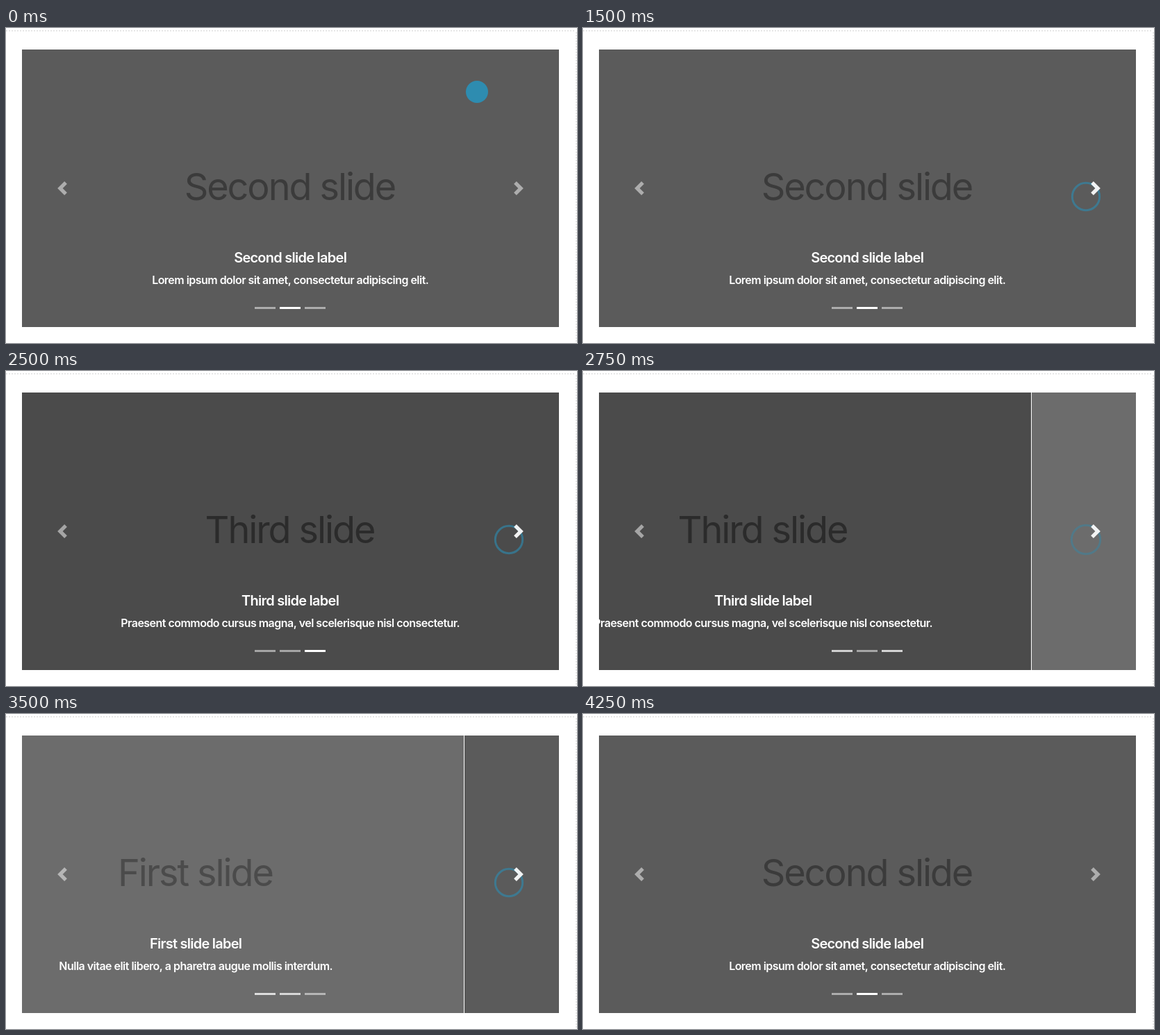
An HTML page with a canvas for the animation above (4.75 s loop, 822x454 px).

```html
<!DOCTYPE html>
<html lang="en">
<head>
<meta charset="utf-8">
<title>Carousel</title>
<style>
  html, body { margin: 0; width: 100%; height: 100%; overflow: hidden; background: #fff; }
  canvas { display: block; font-optical-sizing: none; }
</style>
</head>
<body>
<canvas id="stage" width="822" height="454"></canvas>
<script>
const ctx = document.getElementById('stage').getContext('2d');
const LOOP = 4750;
const STEP = 250; // the picture is sampled four times a second
const FRAME = { x: 23, y: 31, w: 773, h: 400 };
const SANS = 'Inter, "Liberation Sans", sans-serif';
const BLUE = '#2e8cb0';

const slides = [
  { title: 'First slide', bg: '#6c6c6c', ink: '#4b4b4b',
    text: 'Nulla vitae elit libero, a pharetra augue mollis interdum.' },
  { title: 'Second slide', bg: '#5b5b5b', ink: '#3b3b3b',
    text: 'Lorem ipsum dolor sit amet, consectetur adipiscing elit.' },
  { title: 'Third slide', bg: '#4b4b4b', ink: '#2b2b2b',
    text: 'Praesent commodo cursus magna, vel scelerisque nisl consectetur.' }
];

const turns = [
  { start: 1591, duration: 526 },
  { start: 2588.5, duration: 557 },
  { start: 3252, duration: 901 }
];

const presses = [700, 1480, 2480, 3480];
const RING_LIFE = 530;

const pointerPath = [
  { t: 250, x: 678, y: 92 },
  { t: 500, x: 606, y: 221 },
  { t: 750, x: 604, y: 241 },
  { t: 1250, x: 724, y: 243 },
  { t: 3500, x: 724, y: 243 },
  { t: 3750, x: 750, y: 154 }
];

const nextIcon = new Path2D('M2.75 0l-1.5 1.5 2.5 2.5-2.5 2.5 1.5 1.5 4-4-4-4z');
const prevIcon = new Path2D('M5.25 0l-4 4 4 4 1.5-1.5-2.5-2.5 2.5-2.5-1.5-1.5z');

const clamp = v => Math.min(1, Math.max(0, v));
const mix = (a, b, k) => a + (b - a) * k;
const easeInOut = k => (1 - Math.cos(Math.PI * clamp(k))) / 2;

function carouselAt(time) {
  const started = turns.filter(turn => turn.start <= time);
  const turn = started.at(-1);
  const progress = turn ? easeInOut((time - turn.start) / turn.duration) : 1;
  const current = (1 + started.length) % 3;
  return { current, previous: (current + 2) % 3, progress };
}

function pointerAt(time) {
  const next = pointerPath.findIndex(point => point.t >= time);
  if (next < 0) return null;
  const b = pointerPath[next];
  const a = pointerPath[next - 1] || b;
  const k = clamp((time - a.t) / (b.t - a.t || 1));
  return { x: mix(a.x, b.x, k), y: mix(a.y, b.y, k) };
}

function label(text, x, y, weight, size, spacing, color) {
  ctx.font = `${weight} ${size}px ${SANS}`;
  ctx.letterSpacing = spacing + 'px';
  ctx.textAlign = 'center';
  ctx.fillStyle = color;
  ctx.fillText(text, x + spacing / 2, y);
}

function drawSlide({ title, bg, ink, text }, shift) {
  const middle = FRAME.x + FRAME.w / 2 + shift;
  ctx.fillStyle = bg;
  ctx.fillRect(FRAME.x + shift, FRAME.y, FRAME.w, FRAME.h);
  label(title, middle, 248, 400, 54, -2.1, ink);
  label(title + ' label', middle, 338, 600, 20, -0.75, '#fff');
  label(text, middle, 369, 600, 16, -0.53, '#fff');
}

function drawSlides({ current, previous, progress }) {
  const offset = Math.floor(FRAME.w * (1 - progress));
  ctx.save();
  ctx.beginPath();
  ctx.rect(FRAME.x, FRAME.y, FRAME.w, FRAME.h);
  ctx.clip();
  if (offset) {
    drawSlide(slides[previous], offset - FRAME.w);
    ctx.fillStyle = '#fff';
    ctx.fillRect(FRAME.x + offset - 1, FRAME.y, 1, FRAME.h);
  }
  drawSlide(slides[current], offset);
  ctx.restore();
}

function drawIndicators({ current, previous, progress }) {
  const fade = clamp(progress * 1.2 + 0.25);
  slides.forEach((slide, i) => {
    const active = i === current ? fade : i === previous ? 1 - fade : 0;
    ctx.fillStyle = `rgba(255, 255, 255, ${0.5 + active / 2})`;
    ctx.fillRect(358 + i * 36, 402, 30, 3);
  });
}

function drawIcon(path, x, alpha) {
  ctx.save();
  ctx.translate(x, 221);
  ctx.scale(2.5, 2.5);
  ctx.fillStyle = `rgba(255, 255, 255, ${alpha})`;
  ctx.fill(path);
  ctx.restore();
}

// A plain disc that turns into a growing, fading ring after each press.
function drawPointer(time) {
  const pointer = pointerAt(time);
  if (!pointer) return;
  const age = time - presses.findLast(press => press <= time);
  ctx.beginPath();
  if (age < RING_LIFE) {
    ctx.globalAlpha = 0.64 - age * 0.0008;
    ctx.arc(pointer.x, pointer.y, 19.6 + age * 0.004, 0, 2 * Math.PI);
    ctx.strokeStyle = BLUE;
    ctx.lineWidth = 3;
    ctx.stroke();
  } else {
    ctx.arc(pointer.x, pointer.y, 16, 0, 2 * Math.PI);
    ctx.fillStyle = BLUE;
    ctx.fill();
  }
  ctx.globalAlpha = 1;
}

function drawBorder() {
  ctx.strokeStyle = '#e6e6e6';
  ctx.lineWidth = 2;
  ctx.setLineDash([2, 2]);
  ctx.beginPath();
  ctx.moveTo(0, 4);
  ctx.lineTo(820, 4);
  ctx.moveTo(821, 6);
  ctx.lineTo(821, 454);
  ctx.stroke();
  ctx.setLineDash([]);
}

function draw(time) {
  const carousel = carouselAt(time);
  const hovered = time >= 1250 && time < 4250;
  ctx.fillStyle = '#fff';
  ctx.fillRect(0, 0, 822, 454);
  drawBorder();
  drawSlides(carousel);
  drawIndicators(carousel);
  drawPointer(time);
  drawIcon(prevIcon, 71, 0.5);
  drawIcon(nextIcon, 728, hovered ? 0.92 : 0.5);
}

function tick() {
  const time = performance.now() % LOOP;
  draw(Math.floor(time / STEP) * STEP);
  requestAnimationFrame(tick);
}
tick();
</script>
</body>
</html>
```
